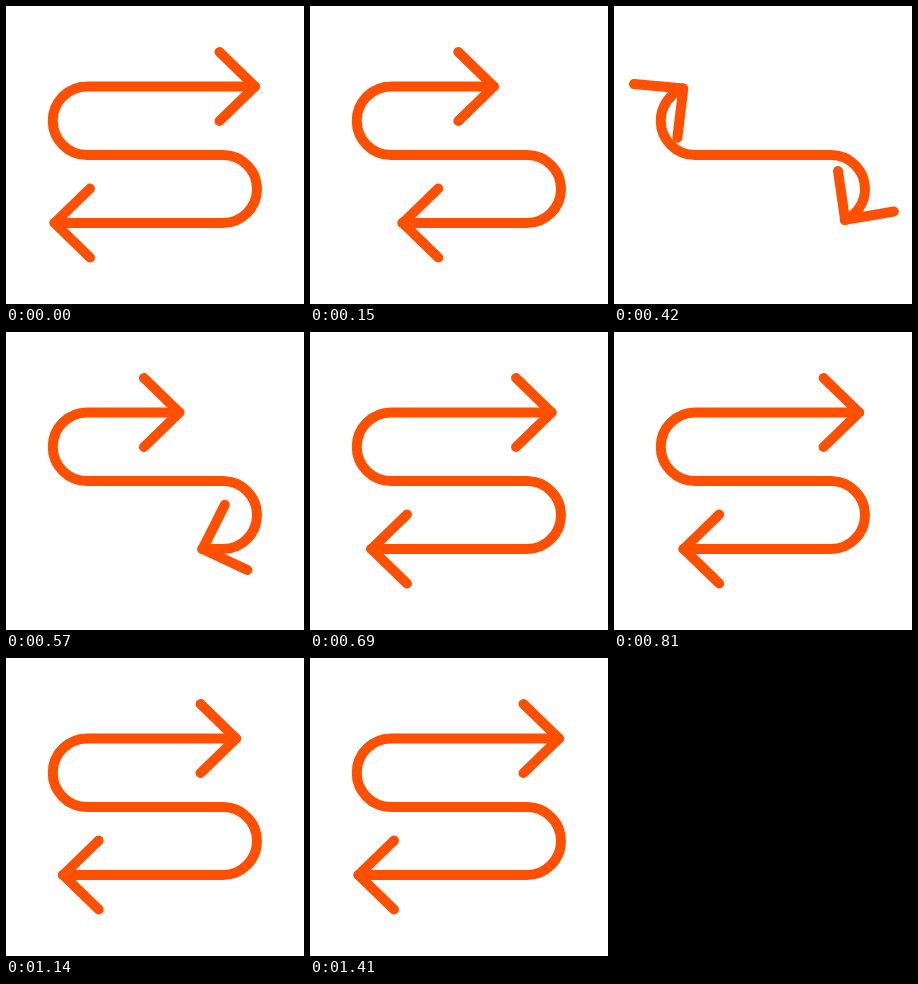
An HTML page that plays this animation: 298x298 px, repeating every 1.8 s.

```html
<!DOCTYPE html>
<html>
<head>
<meta charset="utf-8">
<style>
  html, body { margin: 0; width: 100%; height: 100%; overflow: hidden; background: #fff; }
  svg { display: block; width: 100vw; height: 100vh; }
  path { fill: none; stroke: #ff4f00; stroke-width: 10; stroke-linecap: round; stroke-linejoin: round; }
</style>
</head>
<body>
<svg viewBox="0 0 298 298">
  <path id="shaft" d="M249 80.5H81A34 34 0 0 0 81 149H217A34 34 0 0 1 217 217H48.5"/>
  <path id="topHead" d="M-35.5-34.5L0 0L-35.5 34.5"/>
  <path id="bottomHead" d="M-35.5-34.5L0 0L-35.5 34.5"/>
</svg>
<script>
const STEP = 30, LOOP = 1800, STRAIGHT = 168;
const [shaft, topHead, bottomHead] = document.querySelectorAll('path');
const total = shaft.getTotalLength();

// [step, distance pulled back from rest, easing skew]
const topKeys = [[0, 0], [12.55, 190, 1], [24.7, 0, 0.9], [33.6, 25, 1], [47, 0, 1]];
const bottomKeys = [[0, 0], [16.5, 193, 0.96], [24.3, 0, 1], [31, 60.5, 1], [40.3, 0, 1]];

function pullAt(keys, step) {
  const i = keys.findIndex(key => key[0] > step);
  if (i < 0) return 0;
  const [t0, d0] = keys[i - 1], [t1, d1, skew] = keys[i];
  const u = ((step - t0) / (t1 - t0)) ** skew;
  return d0 + (d1 - d0) * (1 - Math.cos(Math.PI * u)) / 2;
}

// Heads start turning shortly before they reach the bend.
function placeHead(head, along, pull, heading, lead) {
  const p = shaft.getPointAtLength(along);
  const turn = Math.max(0, pull - STRAIGHT + lead);
  head.setAttribute('transform', `translate(${p.x} ${p.y}) rotate(${heading - turn})`);
}

function draw(now) {
  const step = Math.floor((now % LOOP) / STEP);
  const top = pullAt(topKeys, step), bottom = pullAt(bottomKeys, step);
  shaft.style.strokeDasharray = `${total - top - bottom} ${total * 2}`;
  shaft.style.strokeDashoffset = -top;
  placeHead(topHead, top, top, 0, 27);
  placeHead(bottomHead, total - bottom, bottom, 180, 39);
}

function tick() {
  draw(performance.now());
  requestAnimationFrame(tick);
}
tick();
</script>
</body>
</html>
```
